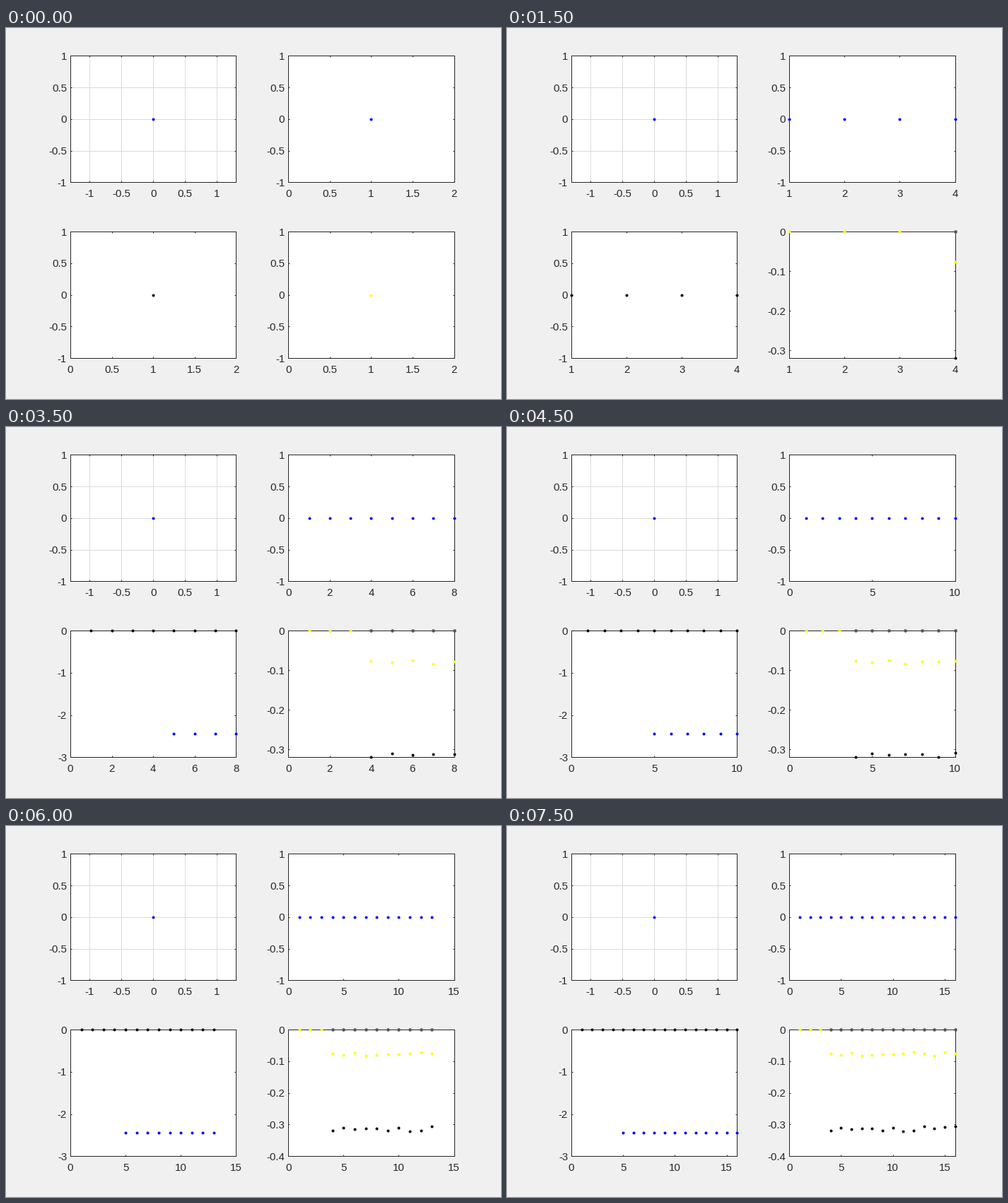
These frames come from a looping animation (700x525 px, 8000 ms). A matplotlib script:

```python
import numpy as np
import matplotlib.pyplot as plt
from matplotlib.animation import FuncAnimation

DPI = 100
PX = 72 / DPI  # points per pixel
FRAMES, INTERVAL = 16, 500
INK = "#262626"

plt.rcParams["font.family"] = "Liberation Sans"

fig = plt.figure(figsize=(7, 5.25), dpi=DPI, facecolor="#f0f0f0")

# Readings from step 4 onward
LOW = -np.array([.3194, .3098, .3137, .3125, .313, .3187, .309,
                 .3205, .319, .3055, .313, .308, .306])
MID = -np.array([.0766, .080, .074, .083, .079, .0782, .077,
                 .0747, .0715, .0765, .0825, .072, .0747])


def make_axes(left, bottom):
    ax = fig.add_axes([left, bottom, 0.33466, 0.34116], facecolor="white")
    ax.set_axisbelow(True)
    ax.tick_params(direction="in", top=True, right=True, length=2.3 * PX,
                   width=PX, color=INK, labelcolor=INK, labelsize=15 * PX)
    ax.tick_params(axis="x", pad=9.8 * PX)
    ax.tick_params(axis="y", pad=5 * PX)
    for spine in ax.spines.values():
        spine.set(linewidth=PX, edgecolor=INK)
    return ax


def dots(ax, color, size=4):
    return ax.plot([], [], "o", color=color, ms=size * PX, mew=0,
                   zorder=3, clip_on=False)[0]


def scale(axis, lo, hi, step):
    first, last = np.ceil(lo / step - 1e-6), np.floor(hi / step + 1e-6)
    ticks = np.round(np.arange(first, last + 1) * step, 3) + 0.0
    axis.set_ticks(ticks, [f"{t:g}" for t in ticks])
    axis.axes.set(**{f"{axis.axis_name}lim": (lo, hi)})


def x_scale(n):
    if n == 1:
        return 0, 2, 0.5
    if n <= 5:
        return 1, n, 0.5 if n < 4 else 1
    if n <= 8:
        return 0, n + n % 2, 2
    if n <= 10:
        return 0, 10, 5
    return 0, 15 if 13 <= n <= 15 else n, 5


LEFT, RIGHT, BOTTOM, TOP = 0.13, 0.57034, 0.11, 0.58384
pos_ax = make_axes(LEFT, TOP)
flat_ax = make_axes(RIGHT, TOP)
step_ax = make_axes(LEFT, BOTTOM)
noise_ax = make_axes(RIGHT, BOTTOM)

pos_ax.grid(color="#dbdbdb", linewidth=PX)
scale(pos_ax.xaxis, -1.3, 1.3, 0.5)
scale(pos_ax.yaxis, -1, 1, 0.5)
scale(flat_ax.yaxis, -1, 1, 0.5)
dots(pos_ax, "blue").set_data([0], [0])

flat = dots(flat_ax, "blue")
step_zero = dots(step_ax, "black")
step_low = dots(step_ax, "blue")
noise_low = dots(noise_ax, "black")
noise_zero = dots(noise_ax, "#555555", 4.6)
noise_mid = dots(noise_ax, "yellow")


def update(i):
    n = i + 1
    t = np.arange(1, n + 1)
    late = t[3:]
    for ax in (flat_ax, step_ax, noise_ax):
        scale(ax.xaxis, *x_scale(n))

    flat.set_data(t, 0 * t)
    step_zero.set_data(t, 0 * t)
    step_low.set_data(t[4:], np.full(len(t[4:]), -2.45))
    scale(step_ax.yaxis, *((-1, 1, 0.5) if n < 5 else (-3, 0, 1)))

    noise_low.set_data(late, LOW[:len(late)])
    noise_zero.set_data(late, 0 * late)
    noise_mid.set_data(t, np.r_[np.zeros(3), MID][:n])
    if n < 4:
        scale(noise_ax.yaxis, -1, 1, 0.5)
    else:
        scale(noise_ax.yaxis, -0.32 if n < 11 else -0.4, 0, 0.1)


anim = FuncAnimation(fig, update, frames=FRAMES, interval=INTERVAL,
                     repeat=True, repeat_delay=0)
plt.show()
```
